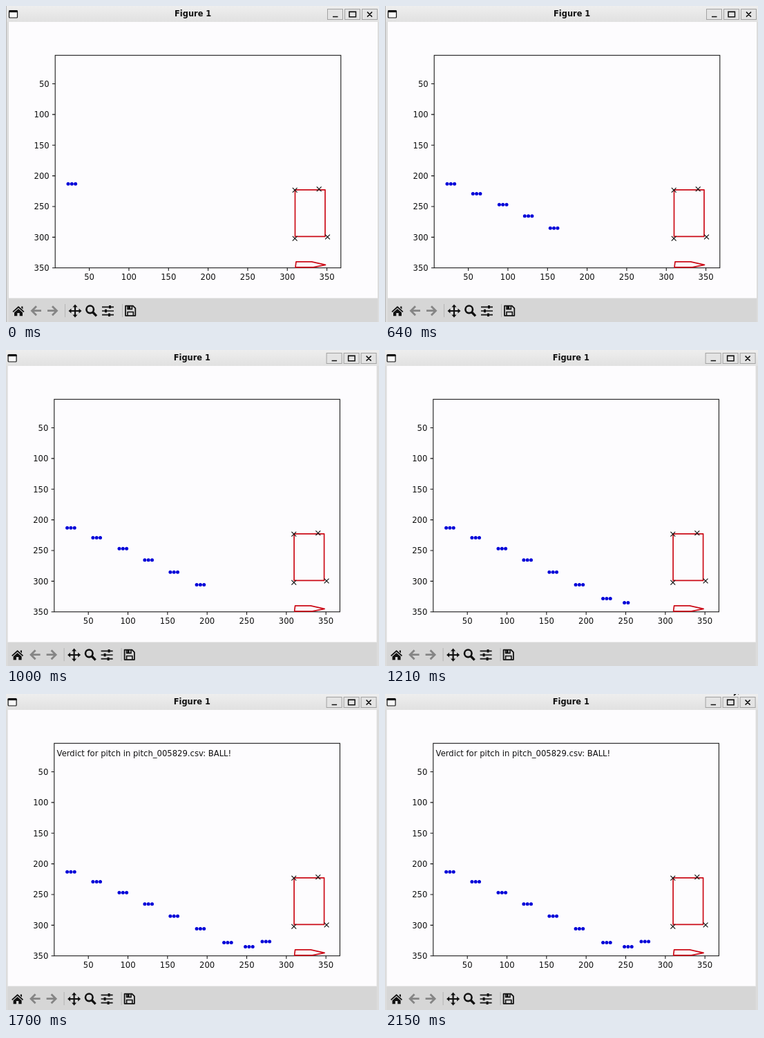
Write an HTML page that moves like this. It is 540 px wide and 457 px high and loops after 2180 ms.

```html
<!DOCTYPE html>
<html lang="en">
<head>
<meta charset="utf-8">
<title>Figure 1</title>
<style>
  html, body { margin: 0; width: 100%; height: 100%; overflow: hidden; background: #dcdcdc; }
  svg { display: block; width: 540px; height: 457px; }
  text { font-family: "DejaVu Sans", sans-serif; font-size: 11.6px; fill: #111; }
  .title { font-size: 11.4px; font-weight: bold; text-anchor: middle; }
  .status { font-size: 11px; }
  .axis { fill: none; stroke: #111; stroke-width: 1.05; }
  .zone { fill: none; stroke: #cc0c18; stroke-width: 1.7; stroke-linejoin: round; }
  .mark { fill: none; stroke: #111; stroke-width: 1.2; }
  .dot { fill: #0000d8; }
  .button { fill: #e4e4e4; stroke: #a2a2a2; }
  .glyph { fill: none; stroke: #111; stroke-width: 1.5; }
  .arrow { fill: none; stroke: #858585; stroke-width: 2.8; }
  .sep { stroke: #b4b4b4; }
</style>
</head>
<body>
<svg viewBox="0 0 540 457">
  <defs>
    <linearGradient id="bar" x2="0" y2="1">
      <stop offset="0" stop-color="#eeeeee"/><stop offset="1" stop-color="#e1e1e1"/>
    </linearGradient>
    <clipPath id="statusClip"><rect x="440" y="425" width="90" height="30"/></clipPath>
  </defs>
  <g id="win">
    <rect x="-2" width="548" height="457" fill="#dcdcdc"/>
    <rect x="-2" width="548" height="23" fill="url(#bar)"/>
    <path d="M0.5 0V457" stroke="#b8b8b8"/>
    <rect x="4" y="23" width="534" height="400" fill="#fdfcfe"/>
    <rect x="4" y="422.5" width="534" height="34.5" fill="#d6d6d6"/>

    <rect x="4.5" y="6.5" width="12" height="10.5" rx="1" fill="#f8f8f8" stroke="#111" stroke-width="1.2"/>
    <path d="M4 8H17" stroke="#111" stroke-width="2.4"/>
    <text class="title" x="270.7" y="15.4">Figure 1</text>
    <rect class="button" x="465.5" y="4.5" width="22" height="15"/>
    <rect class="button" x="490.5" y="4.5" width="22" height="15"/>
    <rect class="button" x="515.5" y="4.5" width="22" height="15"/>
    <path class="glyph" d="M473 15.5h7.5M497 8.2h9.5v7.6h-9.5zM496.5 8.5h10.5M523 8.6l7 7M530 8.6l-7 7"/>

    <rect class="axis" x="71.2" y="71.3" width="413.6" height="307.4"/>
    <g id="ticks"></g>

    <path class="zone" d="M418.5 265.8H462V333.4H418.5Z"/>
    <path class="zone" d="M419 377.8L420 369.8H442.5L462.5 374.3L445 377.8Z"/>
    <g id="marks"></g>
    <g id="dots"></g>
    <text id="verdict" x="75" y="90">Verdict for pitch in pitch_005829.csv: BALL!</text>

    <!-- toolbar -->
    <path d="M18 434l8.5 7.7-1.2 1.2L18 436.5l-7.3 6.4-1.2-1.2zM22.2 434.5h2.2v4l-2.2-2zM18 438l6 5.2v5h-4.3v-4.2h-3.4v4.2H12v-5z" fill="#111"/>
    <path class="arrow" d="M44 434.2l-6.5 6.5 6.5 6.5M38 440.7h13"/>
    <path class="arrow" d="M67 434.2l6.5 6.5-6.5 6.5M73 440.7H60"/>
    <path class="sep" d="M85.5 431v19M168.5 431v19"/>
    <path d="M100 434v14M93 441h14" stroke="#111" stroke-width="2.2"/>
    <path d="M100 431.5l3.5 4h-7zM100 450.5l3.5-4h-7zM90.5 441l4-3.5v7zM109.5 441l-4-3.5v7z" fill="#111"/>
    <circle cx="121.7" cy="438.8" r="5.3" fill="none" stroke="#111" stroke-width="2.6"/>
    <path d="M125.6 442.8l5.4 5.6" stroke="#111" stroke-width="3.4"/>
    <path d="M139 435.3h17M139 441h17M139 446.7h17" stroke="#111" stroke-width="1.7"/>
    <path d="M150.5 433v4.6M144.5 438.7v4.6M149.5 444.4v4.6" stroke="#111" stroke-width="3"/>
    <path d="M173 433.7h10.8l3.5 3.5v10.6H173z" fill="none" stroke="#111" stroke-width="1.8" stroke-linejoin="round"/>
    <path d="M176 434v4.4h6.4V434M176 447.5v-5h8.3v5" fill="none" stroke="#111" stroke-width="1.6"/>
    <path d="M177 434h3v4h-3z" fill="#111"/>
    <g clip-path="url(#statusClip)"><text id="status" class="status" x="456" y="444">x=70.6 y=9.9</text></g>
  </g>
  <path id="cursor" d="M0 0L-9.8 3L-6.3 5L-10.8 9.5L-9.2 11L-4.8 6.6L-3.2 9.8Z" fill="#080808" stroke="#fff" stroke-width=".5"/>
</svg>
<script>
  const LOOP = 2180, STEP = 30;
  const $ = id => document.getElementById(id);
  const add = (parent, tag, attrs, text = "") => {
    const el = document.createElementNS("http://www.w3.org/2000/svg", tag);
    for (const key in attrs) el.setAttribute(key, attrs[key]);
    el.textContent = text;
    return parent.appendChild(el);
  };
  const show = (el, on) => el.setAttribute("visibility", on ? "visible" : "hidden");

  for (let i = 0; i < 7; i++) {
    const x = 120.6 + i * 57.33, y = 112.5 + i * 44.37, label = 50 * (i + 1);
    add($("ticks"), "path", { class: "axis", d: `M${x} 378.7v4.2M71.2 ${y}h-4.2` });
    add($("ticks"), "text", { x, y: 395.9, "text-anchor": "middle" }, label);
    add($("ticks"), "text", { x: 62.7, y: y + 4.3, "text-anchor": "end" }, label);
  }

  for (const [x, y] of [[418.2, 266.2], [453.2, 264.8], [465.5, 334], [418.2, 336.3]])
    add($("marks"), "path", { class: "mark", d: `M${x - 3.4} ${y - 3.4}l6.8 6.8m0-6.8l-6.8 6.8` });

  // first dot of each group of three
  const groups = [[90, 257.2], [127.3, 271.4], [165.4, 287.3], [202.3, 303.8], [239.3, 321.3],
    [277.5, 339.6], [317, 359.6], [348, 365.5], [372.4, 358]];
  // start, gap, number of dots
  const bursts = [[0, 0, 3], [60, 60, 6], [450, 20, 6], [820, 60, 3], [1030, 37, 9]];
  const times = bursts.flatMap(([start, gap, n]) => Array.from({ length: n }, (_, i) => start + i * gap));
  const dots = times.map((at, i) => {
    const [x, y] = groups[Math.floor(i / 3)];
    return { at, el: add($("dots"), "circle", { class: "dot", cx: x + (i % 3) * 5.3, cy: y, r: 2.5 }) };
  });

  function cursorAt(t) {
    if (t >= 1970) {
      const k = Math.min(1, Math.floor((t - 1970) / STEP) * STEP / 180);
      return [434 + 81 * k, 323 - 331 * k];
    }
    if (t < 330 || t >= 480) return null;
    return t < 360 ? [60, 118] : t < 390 ? [112, 92] : t < 450 ? [156, 74] : [190, 30];
  }

  function draw(t) {
    for (const dot of dots) show(dot.el, t >= dot.at);
    show($("verdict"), t >= 1540);
    show($("status"), t >= 360 && t < 450);
    $("win").setAttribute("transform", `translate(${t >= 670 ? -1.4 : 0} 0)`);
    const tip = cursorAt(t);
    show($("cursor"), tip);
    if (tip) $("cursor").setAttribute("transform", `translate(${tip})`);
  }

  function tick() {
    draw(performance.now() % LOOP);
    requestAnimationFrame(tick);
  }
  tick();
</script>
</body>
</html>
```
